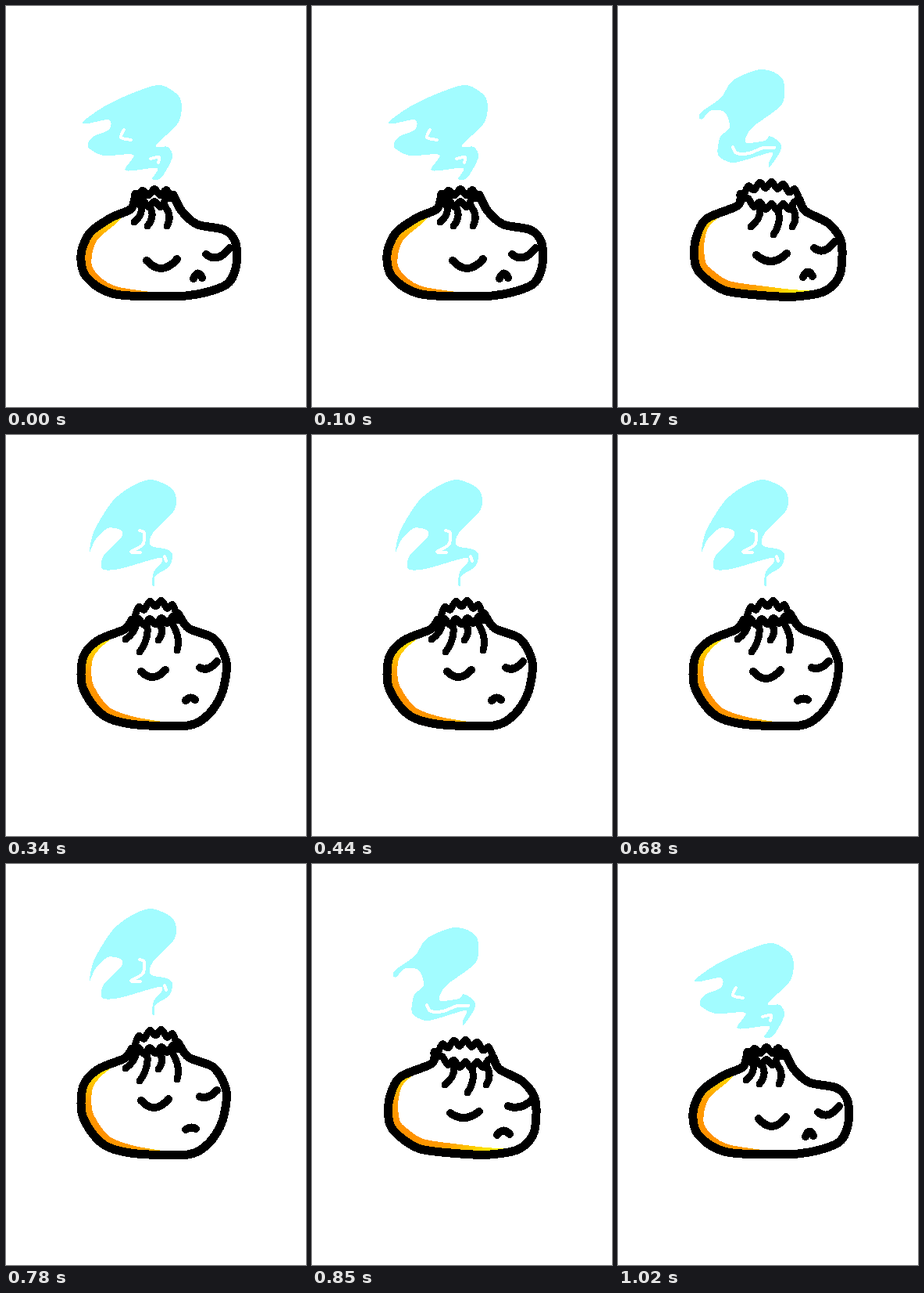
These frames come from a looping animation (384 by 512 pixels, 1190 ms). An HTML page:

```html
<!DOCTYPE html>
<html lang="en">
<head>
<meta charset="utf-8">
<title>Steaming bun</title>
<style>
html, body { margin: 0; width: 100%; height: 100%; overflow: hidden; background: #fff; }
svg { display: block; width: 100%; height: 100%; shape-rendering: crispEdges; }
path { fill: none; stroke-linecap: round; stroke-linejoin: round; }
.line { stroke: #000; stroke-width: 10; }
.body { stroke-width: 11; }
.fold { stroke-width: 9; }
.steam { fill: #a2fcff; }
.gap { stroke: #fff; stroke-width: 4; }
.rim { fill: url(#warm); }
.step { visibility: hidden; animation: show 1190ms step-end infinite; }
@keyframes show { 0% { visibility: visible; } 14.2857%, 100% { visibility: hidden; } }
</style>
</head>
<body>
<svg id="stage" viewBox="0 0 384 512">
  <defs>
    <radialGradient id="warm" gradientUnits="userSpaceOnUse" cx="0" cy="0" r="1"
      gradientTransform="translate(116 345) scale(150 112)">
      <stop offset="0" stop-color="#ff9000"/>
      <stop offset=".38" stop-color="#ff9c00"/>
      <stop offset=".7" stop-color="#ffdc00"/>
      <stop offset=".85" stop-color="#f8f000"/>
      <stop offset="1" stop-color="#d8f020"/>
    </radialGradient>
  </defs>
</svg>
<script>
// Key points of the bun from squashed to stretched.
// rim: last body point with a warm edge; crown: ends, rise, dip and number of pleats;
// folds: start and reach; face: where the left eye, right eye and mouth begin.
const poses = [
  {
    body: '166,240 160,259 135,270 107,290 96,318 103,346 140,368 230,370 280,357 294,335 294,303 280,286 245,279 225,262 214,241',
    rim: 7,
    crown: [[167, 243], [213, 242], 5, -11, 3],
    folds: [[172, 254, -8, 22], [184, 256, -3, 25], [203, 255, 3, 26]],
    face: [[180, 325], [256, 317], [240, 348]],
    steam: '99,147 128,127 165,110 198,101 223,118 221,148 192,178 207,180 213,193 199,219 187,221 193,207 153,210 163,190 125,191 105,180 111,167 132,158 132,145 105,150',
    gaps: ['151,158 147,168 160,171', '185,195 196,193 195,200']
  },
  {
    body: '157,240 153,255 113,272 99,300 99,330 111,347 139,364 190,370 228,371 265,364 284,343 286,302 270,278 240,262 232,247',
    rim: 9,
    crown: [[159, 243], [234, 248], 17, -11, 5],
    folds: [[181, 258, -11, 24], [204, 258, -5, 34], [222, 256, 1, 26]],
    face: [[177, 318], [251, 309], [237, 346]],
    steam: '104,143 107,135 132,117 147,95 183,81 210,92 210,125 172,155 163,174 188,172 194,166 207,174 208,185 194,206 193,200 197,187 165,196 145,200 128,190 131,167 143,155 137,136 120,133 108,144',
    gaps: ['147,180 152,188 168,188 186,181 200,181']
  },
  {
    body: '161,236 152,248 118,262 99,283 97,318 112,346 132,362 168,370 233,371 260,356 277,328 282,290 266,260 234,247 220,228',
    rim: 8,
    crown: [[162, 237], [221, 233], 20, -3, 4],
    folds: [[166, 238, -13, 23], [180, 240, -9, 37], [195, 238, 0, 24], [211, 238, 8, 37]],
    face: [[173, 302], [248, 297], [230, 339]],
    steam: '107,149 113,122 136,85 160,66 186,57 214,70 216,95 188,125 185,141 206,146 213,153 209,168 191,180 190,192 187,191 189,175 199,163 195,157 145,171 123,171 125,154 148,130 146,121 130,119 115,133',
    gaps: ['171,122 177,125 175,140 160,149 172,150', '203,155 205,161']
  },
  {
    body: '168,206 162,218 133,250 119,272 115,302 121,331 138,353 188,371 218,371 243,361 255,345 271,308 270,278 253,242 234,221 214,206',
    rim: 9,
    crown: [[169, 202], [216, 202], 14, -5, 4],
    folds: [[182, 209, -13, 31], [195, 209, -7, 38], [206, 207, 7, 29]],
    face: [[180, 287], [243, 277], [227, 322]],
    steam: '119,150 119,132 134,100 160,70 190,55 204,62 203,90 184,111 207,107 217,118 214,138 204,152 200,169 197,158 199,143 190,139 165,147 153,141 151,117 143,112 126,127',
    gaps: ['190,126 207,124 208,132 203,139']
  }
];

// Pose, then width and sag of the left eye, right eye and mouth.
const steps = [
  [0, [39, 11], [30, 8], [11, -6]],
  [1, [39, 9], [26, 7], [12, -6]],
  [2, [31, 8], [22, 5], [12, -3]],
  [3, [28, 11], [22, 9], [13, -3]],
  [2, [35, 10], [22, 4], [13, -2]],
  [1, [37, 7], [31, 5], [16, -5]],
  [0, [35, 11], [27, 7], [10, -6]]
];
const tilt = [-2, -8, -1];

const stage = document.getElementById('stage');
const points = s => s.split(' ').map(p => p.split(',').map(Number));

// Smooth curve through all points.
function curve(pts, closed) {
  const n = pts.length;
  const at = i => pts[closed ? (i + n) % n : Math.max(0, Math.min(n - 1, i))];
  let d = 'M' + pts[0];
  for (let i = 0; i < (closed ? n : n - 1); i++) {
    const [a, b, c, e] = [at(i - 1), at(i), at(i + 1), at(i + 2)];
    const c1 = b.map((v, k) => v + (c[k] - a[k]) / 7);
    const c2 = c.map((v, k) => v - (e[k] - b[k]) / 7);
    d += `C${c1} ${c2} ${c}`;
  }
  return closed ? d + 'Z' : d;
}

// Wavy line from a to b, arched by lift.
function pleats(a, b, lift, count) {
  const pts = [];
  for (let i = 0; i <= 2 * count; i++) {
    const t = i / (2 * count);
    const arch = lift * Math.sqrt(Math.abs(Math.sin(Math.PI * t)));
    pts.push([a[0] + (b[0] - a[0]) * t, a[1] + (b[1] - a[1]) * t - arch + (i % 2 ? -4 : 4)]);
  }
  return curve(pts);
}

// Crescent between the outline and a copy moved inward, thin at both ends.
function crescent(pts, last) {
  const inner = [];
  for (let i = 1; i <= last; i++) {
    const dx = pts[i + 1][0] - pts[i - 1][0], dy = pts[i + 1][1] - pts[i - 1][1];
    const depth = 14 * Math.sqrt(Math.sin(Math.PI * (i - 1) / (last - 1)) + 1e-9) / Math.hypot(dx, dy);
    inner.unshift([pts[i][0] + dy * depth, pts[i][1] - dx * depth]);
  }
  return curve(pts.slice(1, last + 1).concat(inner), true);
}

const bend = ([x, y], dx, dy, cx, cy) => `M${x},${y}q${dx / 2 + cx},${dy / 2 + cy} ${dx},${dy}`;

function add(parent, tag, attrs) {
  const el = document.createElementNS('http://www.w3.org/2000/svg', tag);
  for (const key in attrs) el.setAttribute(key, attrs[key]);
  return parent.appendChild(el);
}

steps.forEach(([pose, ...face], i) => {
  const p = poses[pose];
  const body = points(p.body);
  const [a, b, rise, dip, count] = p.crown;
  const g = add(stage, 'g', { class: 'step', style: `animation-delay: ${(i - steps.length) * 170}ms` });
  const draw = (kind, d) => add(g, 'path', { class: kind, d });

  draw('steam', curve(points(p.steam), true));
  p.gaps.forEach(s => draw('gap', curve(points(s))));
  draw('rim', crescent(body, p.rim));
  draw('line body', curve(body));
  for (const lift of [rise, dip]) draw('line fold', pleats(a, b, lift, count));
  p.folds.forEach(([x, y, dx, dy]) => draw('line fold', bend([x, y], dx, dy, 9, 0)));
  face.forEach(([w, sag], k) => draw('line', bend(p.face[k], w, tilt[k], 0, 2 * sag)));
});
</script>
</body>
</html>
```
